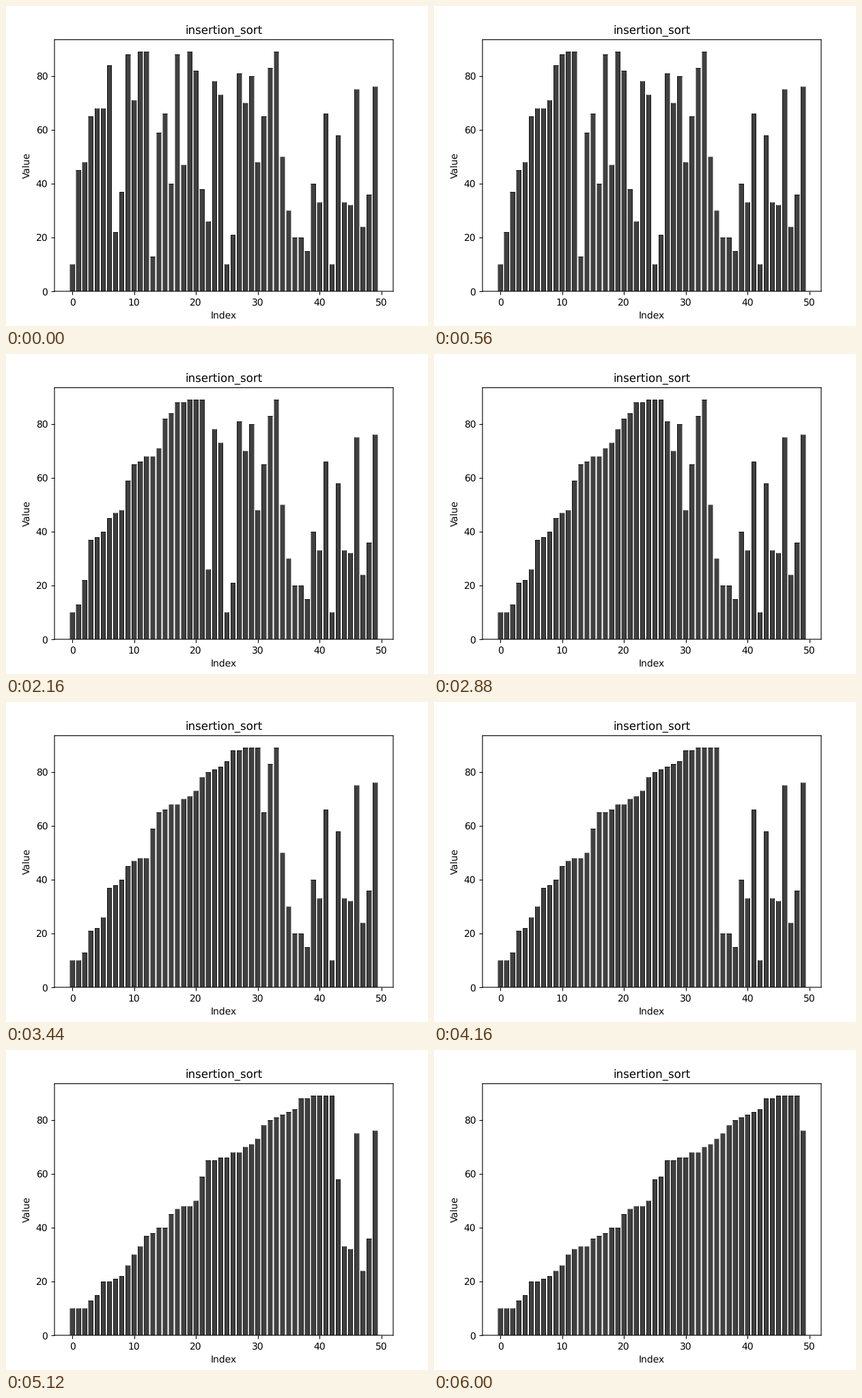
Recreate the animation shown at these times as a matplotlib script. Size 618x470 px, loop 6160 ms.

```python
import numpy as np
import matplotlib.pyplot as plt
from matplotlib.animation import FuncAnimation
from matplotlib.collections import PolyCollection
from matplotlib.transforms import IdentityTransform

W, H, DPI = 618, 470, 100
LEFT, RIGHT, TOP, BOTTOM = 71, 567, 49.5, 419
FRAMES, STEP_MS = 77, 80
FACE, EDGE = "#404040", "#161616"

VALUES = [10, 45, 48, 65, 68, 68, 84, 22, 37, 88,
          71, 89, 89, 13, 59, 66, 40, 88, 47, 89,
          82, 38, 26, 78, 73, 10, 21, 81, 70, 80,
          48, 65, 83, 89, 50, 30, 20, 20, 15, 40,
          33, 66, 10, 58, 33, 32, 75, 24, 36, 76]
SORTED_AT_START = 7

N = len(VALUES)
X_MIN, X_MAX = -2.89, N + 1.89
Y_MAX = max(VALUES) * 1.05
X_UNIT = (RIGHT - LEFT) / (X_MAX - X_MIN)
Y_UNIT = 369.6 / Y_MAX

plt.rcParams.update({"font.family": "DejaVu Sans", "font.size": 10,
                     "text.hinting": "none"})


def half(v):
    """Round to the nearest half pixel."""
    return np.floor(2 * v + 0.5) / 2


def box(x0, x1, y0, y1):
    """Corners of a box given in pixels from the top left."""
    return [(x0, H - y0), (x1, H - y0), (x1, H - y1), (x0, H - y1)]


def values_at(frame):
    """Seven insertions per second, shown at 12.5 frames per second."""
    done = SORTED_AT_START + (14 * frame + 6) // 25
    return sorted(VALUES[:done]) + VALUES[done:]


def bar_shapes(values):
    """Bar bodies, and the dark lines along edges that meet the pixel grid."""
    bodies, lines = [], []
    for i, v in enumerate(values):
        x0 = half(LEFT + (i - 0.4 - X_MIN) * X_UNIT)
        x1 = half(LEFT + (i + 0.4 - X_MIN) * X_UNIT)
        y0 = half(419.2 - v * Y_UNIT)
        bodies.append(box(x0, x1, y0, BOTTOM))
        if x0 % 1 == 0:
            lines.append(box(x0, x0 + 1, y0, BOTTOM))
        if x1 % 1 == 0:
            lines.append(box(x1 - 1, x1, y0, BOTTOM))
        if y0 % 1 == 0:
            lines.append(box(x0, x1, y0, y0 + 1))
    return bodies, lines


fig = plt.figure(figsize=(W / DPI, H / DPI), dpi=DPI, facecolor="white")
ax = fig.add_axes([LEFT / W, 1 - BOTTOM / H,
                   (RIGHT - LEFT) / W, (BOTTOM - TOP) / H])
ax.set(xlim=(X_MIN, X_MAX), ylim=(0, Y_MAX), xlabel="Index", ylabel="Value",
       title="insertion_sort",
       xticks=range(0, 51, 10), yticks=range(0, 81, 20))
for spine in ax.spines.values():
    spine.set_snap(False)


def add_layer(color, z):
    layer = PolyCollection([], facecolors=color, edgecolors="none",
                           linewidths=0, transform=IdentityTransform(),
                           zorder=z, clip_on=False)
    layer.set_snap(False)
    return ax.add_collection(layer, autolim=False)


body_layer = add_layer(FACE, 1)
line_layer = add_layer(EDGE, 1.1)


def update(frame):
    bodies, lines = bar_shapes(values_at(frame))
    body_layer.set_verts(bodies)
    line_layer.set_verts(lines)
    return body_layer, line_layer


anim = FuncAnimation(fig, update, frames=FRAMES, interval=STEP_MS,
                     init_func=lambda: update(0), repeat=True,
                     repeat_delay=0, blit=False)
plt.show()
```
